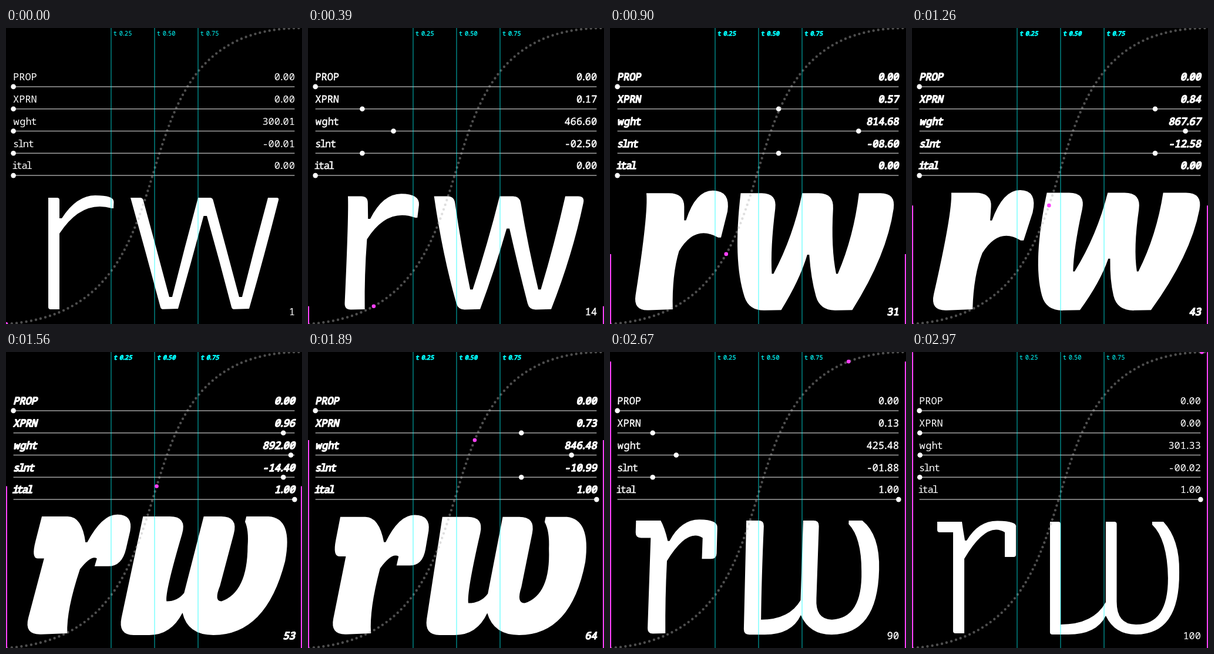
An HTML page for the animation above (3 s loop, 504 px wide and 504 px high).

```html
<!DOCTYPE html>
<html lang="en">
<head>
<meta charset="utf-8">
<title>Variable type axes</title>
<style>
  html, body { margin: 0; width: 100%; height: 100%; overflow: hidden; background: #000; }
  svg { display: block; width: 100vw; height: 100vh; }
  text { font-family: "Noto Sans Mono", "DejaVu Sans Mono", monospace; text-anchor: middle; stroke-linejoin: round; }
</style>
</head>
<body>
<svg id="stage" viewBox="0 0 504 504"></svg>
<script>
const SIZE = 504, FRAMES = 100, STEP = 30, LEFT = 12.6, RIGHT = 491.4, MIDDLE = 385;
const stage = document.getElementById('stage');
const lerp = (a, b, k) => a + (b - a) * k;

function set(el, attrs) {
  for (const key in attrs) el.setAttribute(key, attrs[key]);
}
function add(tag, attrs) {
  const el = document.createElementNS('http://www.w3.org/2000/svg', tag);
  set(el, attrs);
  return stage.appendChild(el);
}

// Contours mix sharp points, rounded corners and curve handles.
const node = kind => (x, y) => ({ kind, x, y });
const on = node('on'), off = node('off'), corner = node('corner');
const between = (a, b, k) => ({ x: lerp(a.x, b.x, k), y: lerp(a.y, b.y, k) });

function contour(nodes, radius) {
  const xy = p => `${p.x.toFixed(2)} ${p.y.toFixed(2)}`;
  const trim = (a, b) => between(a, b, Math.min(0.5, radius / Math.hypot(b.x - a.x, b.y - a.y)));
  return nodes.map((p, i) => {
    const before = nodes.at(i - 1), after = nodes[(i + 1) % nodes.length];
    if (p.kind === 'corner') return `L${xy(trim(p, before))}Q${xy(p)} ${xy(trim(p, after))}`;
    if (p.kind === 'off') return `Q${xy(p)} ${xy(after.kind === 'off' ? between(p, after, 0.5) : after)}`;
    return (i ? 'L' : 'M') + xy(p);
  }).join('') + 'Z';
}

// Upright letters; v(light, heavy) picks a measure for the current weight.
function romanR(v) {
  const top = v(289, 280), notch = v(324, 328), tip = v(307, 365);
  return [
    on(v(72, 42), top), corner(v(91, 114), top), on(v(91, 122), notch), on(v(95, 125), notch),
    off(v(120, 131), v(285, 275)), off(v(184, 190), v(285, 276)), on(v(183.5, 190), v(296, 315)),
    on(v(183, 185), tip), on(v(180, 180), tip), off(v(129, 138), v(292, 341)),
    on(v(91, 121), v(350, 385)), off(v(91, 114), 420), on(v(91, 126), 479),
    corner(v(72, 51), v(479, 482)), off(v(72, 52), 315)
  ];
}

function romanW(v) {
  const top = v(289, 280), bottom = v(479, 481.5), valley = v(458, 412), peak = v(320, 397);
  const gapTop = v(119, 93), gapLow = v(119, 108), gapMid = (gapTop + gapLow) / 2;
  const counter = k => [
    corner(v(232.5, 275) + k * gapTop, top), off(v(256, 274) + k * gapMid, 375),
    on(v(278, 281) + k * gapLow, valley), on(v(283, 283.5) + k * gapLow, valley),
    off(v(304, 308) + k * gapMid, v(374, 352)), on(v(327, 309) + k * gapTop, top)
  ];
  const foot = k => [on(v(293, 308) + k * 121, bottom - 1), corner(v(264, 249) + k * 121, bottom)];
  return [
    on(v(212, 206), top), ...counter(0), ...counter(1), corner(v(465, 472), top),
    off(v(440, 477), 387), ...foot(1), off(v(364, 346), v(398, 432)),
    on(v(342, 339), peak), on(v(336.5, 336), peak), off(v(315, 332), v(400, 435)),
    ...foot(0), off(v(238, 206), v(382, 398))
  ];
}

function italicR(v) {
  const top = v(289, 280), notch = v(321, 324), tip = v(349, 365), serif = v(307, 352);
  return [
    on(v(43, 34), top), on(v(85, 76), top), off(v(87, 102), v(304, 278)),
    on(v(90, 120), notch), on(v(93, 123), notch),
    off(v(113, 136), v(287, 276)), off(v(179, 189), v(288, 277)), on(v(177, 191), v(298, 305)),
    corner(v(177, 192.5), tip), on(v(158, 145.5), tip), on(v(158, 146), v(307, 352)),
    off(v(127, 135), v(287.5, 346)), on(v(89, 122.5), v(352, 370)),
    off(v(89, 117), v(415, 440)), on(v(89, 129), 479), corner(v(70, 55), v(479, 482)),
    on(v(70, 56), serif), corner(v(43, 34), serif)
  ];
}

function italicW(v) {
  const top = v(289, 280), bottom = v(481, 482), bowl = v(464, 424), stem = v(330, 309.5);
  return [
    on(v(235, 206), top), corner(v(253, 282), top), off(v(253, 277), v(380, 412)),
    on(v(253, 284), bowl), off(v(309, 302), bowl), on(stem, v(426, 410)),
    on(stem, top), corner(v(348.5, 369), top), on(v(348.5, 368), v(425, 398)),
    off(v(348.5, 364), bowl), on(v(381, 377), bowl), off(v(436, 417), v(465, 408)),
    on(v(436, 397), v(385, 330)), off(v(435, 392), v(319, 303)),
    on(v(409, 382), v(294, 289)), on(v(409, 382), top), on(v(428, 420), top),
    off(v(456, 463), v(319, 282)), on(v(455, 468), v(375, 356)), off(v(456, 468), bottom),
    on(v(381, 378), bottom), off(v(345, 334), bottom), on(v(330, 315.5), v(449, 444)),
    off(v(314.5, 306), bottom), on(v(266, 269), bottom), corner(v(235, 215), bottom)
  ];
}

// Progress curve
const handle = { x1: 0.7, y1: 0.046, x2: 0.3, y2: 1 };
const bezier = (t, a, b) => 3 * (1 - t) ** 2 * t * a + 3 * (1 - t) * t * t * b + t ** 3;
const curveX = t => SIZE * bezier(t, handle.x1, handle.x2);
const curveY = t => SIZE * (1 - bezier(t, handle.y1, handle.y2));

// Expression eases in, climbs to a sharp peak at half time and mirrors back.
function expression(t) {
  const u = 1 - Math.abs(1 - 2 * t);
  return u * (1 - (1 - u) ** 3.4);
}

// Text: narrow letters get narrow cells, weight comes from a stroke.
const cells = { '.': 4.6, ' ': 7, l: 6.5, i: 6.5, t: 8, w: 11.2 };
function label(y, scale = 1, color = '#fff') {
  return { el: add('text', { 'font-size': 17 * scale, fill: color, stroke: color }), y, scale };
}
function write({ el, y, scale }, string, x, alignRight, heavy, slant) {
  const widths = [...string].map(ch => (cells[ch] || 10.2) * scale);
  let pen = alignRight ? -widths.reduce((a, b) => a + b) : 0;
  const xs = widths.map(w => (pen += w) - w / 2);
  el.textContent = string;
  set(el, {
    x: xs.map(v => v.toFixed(2)).join(' '),
    transform: `translate(${x} ${y}) skewX(${-slant})`,
    'stroke-width': 1.8 * heavy * scale
  });
}

// Scene
const letters = add('path', { fill: '#fff' });
const rows = ['PROP', 'XPRN', 'wght', 'slnt', 'ital'].map((name, i) => {
  const y = 99.9 + 37.8 * i;
  add('path', { d: `M${LEFT} ${y}H${RIGHT}`, stroke: '#a0a0a0', 'stroke-width': 1.5 });
  return { name, tag: label(y - 10.8), value: label(y - 10.8), knob: add('circle', { cy: y, r: 4.3, fill: '#fff' }) };
});
add('path', {
  d: `M0 ${SIZE}C${handle.x1 * SIZE} ${(1 - handle.y1) * SIZE} ${handle.x2 * SIZE} 0 ${SIZE} 0`,
  fill: 'none', stroke: '#b4b4b4', 'stroke-opacity': 0.43, 'stroke-width': 4.4,
  'stroke-linecap': 'round', 'stroke-dasharray': '0 8.3', 'stroke-dashoffset': -1.5
});
const marks = [0.25, 0.5, 0.75].map(t => {
  const x = curveX(t) + 1;
  add('path', { d: `M${x} 0V${SIZE}`, stroke: '#0ff', 'stroke-opacity': 0.55, 'stroke-width': 1.4 });
  return { x: x + 4.5, text: 't ' + t.toFixed(2), tag: label(13, 0.617, '#0ff') };
});
const counter = label(489);
const bars = add('path', { stroke: '#ff40ff', 'stroke-width': 4 });
const dot = add('circle', { r: 3.3, fill: '#ff40ff' });

function draw(frame) {
  const t = frame / FRAMES;
  const s = expression(t);
  const ital = t >= 0.5 ? 1 : 0;
  // Weight gains 500 units in the first half of expression, 100 in the second.
  const heavy = s < 0.5 ? s * 5 / 3 : 5 / 6 + (s - 0.5) / 3;
  const weight = Math.max(300.01, 300 + 600 * heavy);
  const slant = Math.max(0.01, 15 * s);
  const put = (tag, string, x, alignRight) => write(tag, string, x, alignRight, heavy, slant);

  const v = (light, bold) => lerp(light, bold, heavy);
  const shapes = ital ? [italicR, italicW] : [romanR, romanW];
  set(letters, {
    d: shapes.map(shape => contour(shape(v), v(4, 30))).join(''),
    transform: `translate(0 ${MIDDLE}) skewX(${-slant}) translate(0 ${-MIDDLE})`
  });

  const amounts = [0, s, heavy, s, ital];
  const values = ['0.00', s.toFixed(2), weight.toFixed(2), '-' + slant.toFixed(2).padStart(5, '0'), ital.toFixed(2)];
  rows.forEach((row, i) => {
    put(row.tag, row.name, 12, false);
    put(row.value, values[i], 492, true);
    set(row.knob, { cx: lerp(LEFT, RIGHT, amounts[i]) });
  });
  marks.forEach(mark => put(mark.tag, mark.text, mark.x, false));
  put(counter, String(frame + 1), 492, true);

  const x = curveX(t), y = curveY(t);
  set(dot, { cx: x, cy: y });
  set(bars, { d: `M0 ${y}V${SIZE}M${SIZE} ${y}V${SIZE}` });
}

const start = performance.now();
function tick(now) {
  draw(Math.floor(Math.max(0, now - start) / STEP) % FRAMES);
  requestAnimationFrame(tick);
}
draw(0);
requestAnimationFrame(tick);
</script>
</body>
</html>
```
